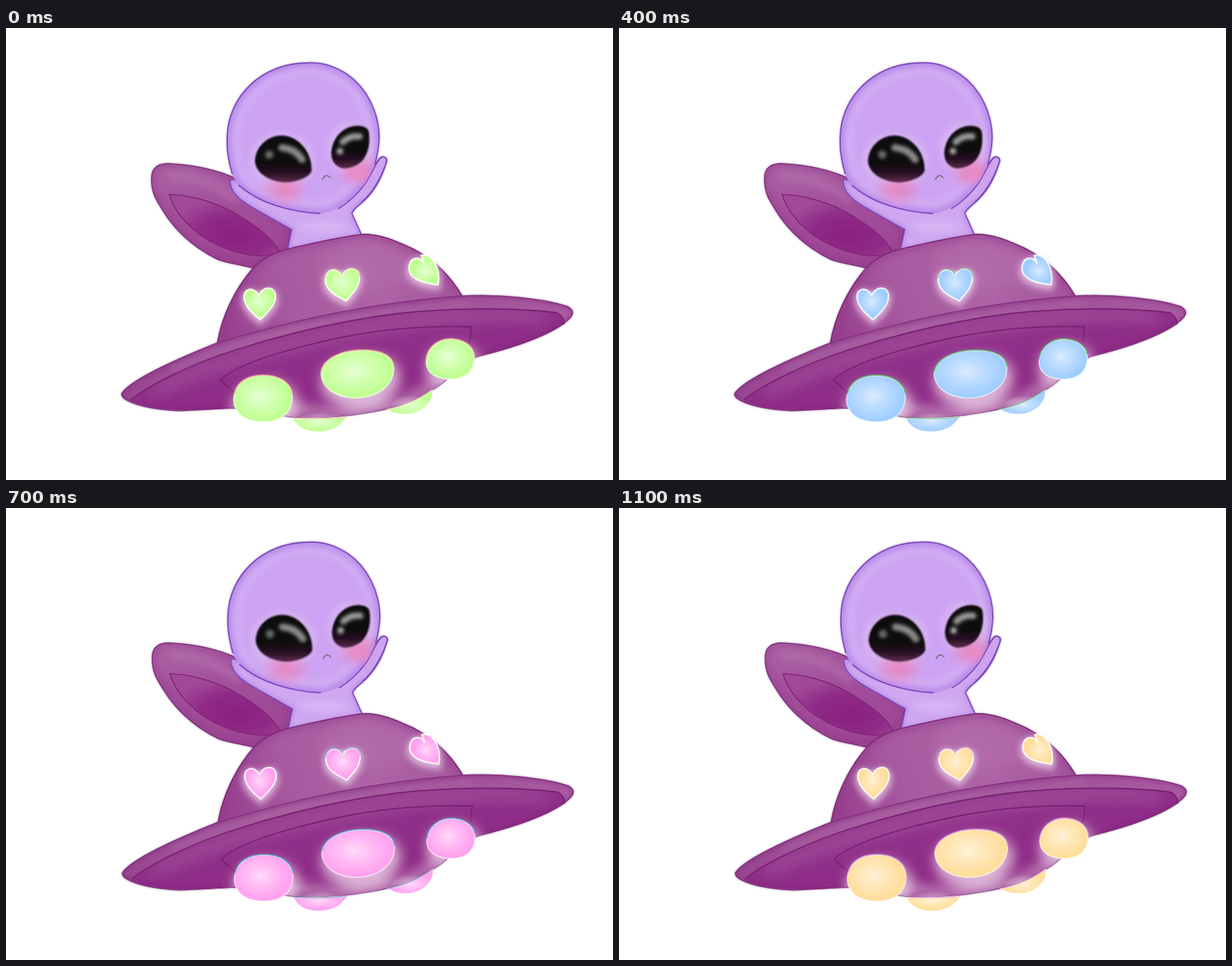
Animation of 867 by 646 pixels, one loop 1200 ms. Source, as an HTML page without scripts:

```html
<!DOCTYPE html>
<html lang="en">
<head>
<meta charset="utf-8">
<title>Little saucer</title>
<style>
html, body { margin: 0; width: 100%; height: 100%; overflow: hidden; background: #fff; }
svg { display: block; width: 100vw; height: 100vh; }
.ship { animation: jitter 1.2s step-end infinite; }
.lights { animation: hue 1.2s step-end infinite; }
.rim { animation: rim 1.2s step-end infinite; fill: none; stroke-width: 1.5; }
@keyframes jitter {
  0% { transform: translate(0, 0); }
  8.333% { transform: translate(1px, -1px); }
  16.667% { transform: translate(1px, 0); }
  25% { transform: translate(1px, -1px); }
  33.333% { transform: translate(0, 0); }
  41.667% { transform: translate(0, -1px); }
  50%, 100% { transform: translate(1px, -1px); }
}
@keyframes hue {
  0% { color: #c1ff93; }
  8.333% { color: #9dffb6; }
  16.667% { color: #98fff0; }
  25% { color: #9ceaff; }
  33.333% { color: #a1ceff; }
  41.667% { color: #bcb4ff; }
  50% { color: #daa0ff; }
  58.333% { color: #ffa2f0; }
  66.667% { color: #ff9fc3; }
  75% { color: #ffa6a3; }
  83.333% { color: #ffc39e; }
  91.667%, 100% { color: #ffde9c; }
}
@keyframes rim {
  0% { stroke: #e9b58c; }
  8.333% { stroke: #d6b35a; }
  16.667% { stroke: #b5b044; }
  25% { stroke: #8dba50; }
  33.333% { stroke: #62b86a; }
  41.667% { stroke: #58b895; }
  50% { stroke: #58b2b6; }
  58.333% { stroke: #5ca4c4; }
  66.667% { stroke: #7088cc; }
  75% { stroke: #8878d0; }
  83.333% { stroke: #b184d4; }
  91.667%, 100% { stroke: #dc9cd4; }
}
</style>
</head>
<body>
<svg viewBox="0 0 867 646" preserveAspectRatio="none">
<defs>
  <filter id="b1" x="-30%" y="-30%" width="160%" height="160%"><feGaussianBlur stdDeviation=".8"/></filter>
  <filter id="b2" x="-50%" y="-50%" width="200%" height="200%"><feGaussianBlur stdDeviation="2.4"/></filter>
  <filter id="b5" x="-50%" y="-50%" width="200%" height="200%"><feGaussianBlur stdDeviation="5"/></filter>
  <filter id="b9" x="-60%" y="-60%" width="220%" height="220%"><feGaussianBlur stdDeviation="9"/></filter>

  <linearGradient id="lidFill" x1=".25" y1="0" x2=".5" y2="1">
    <stop offset="0" stop-color="#aa62a3"/><stop offset=".45" stop-color="#a24f9a"/><stop offset="1" stop-color="#9c4694"/>
  </linearGradient>
  <radialGradient id="lidIn" cx=".6" cy=".66" r=".6">
    <stop offset="0" stop-color="#8a1f80"/><stop offset=".55" stop-color="#8f2a86"/><stop offset="1" stop-color="#a04998"/>
  </radialGradient>
  <linearGradient id="domeFill" x1="0" y1=".6" x2="1" y2=".4">
    <stop offset="0" stop-color="#98408f"/><stop offset=".3" stop-color="#a75a9f"/>
    <stop offset=".65" stop-color="#ad64a6"/><stop offset="1" stop-color="#a4559c"/>
  </linearGradient>
  <linearGradient id="brimFill">
    <stop offset="0" stop-color="#984690"/><stop offset=".35" stop-color="#a3579b"/>
    <stop offset=".7" stop-color="#a04f98"/><stop offset="1" stop-color="#a85aa0"/>
  </linearGradient>
  <linearGradient id="underFill" gradientUnits="userSpaceOnUse" x1="460" y1="400" x2="490" y2="555">
    <stop offset="0" stop-color="#9c4593"/><stop offset=".4" stop-color="#90308a"/><stop offset="1" stop-color="#8c2783"/>
  </linearGradient>
  <radialGradient id="shine" cx=".45" cy=".45" r=".52">
    <stop offset="0" stop-color="#fff" stop-opacity=".62"/><stop offset=".4" stop-color="#fff" stop-opacity=".32"/>
    <stop offset="1" stop-color="#fff" stop-opacity="0"/>
  </radialGradient>
  <linearGradient id="eyeFill" x1="0" y1="0" x2="0" y2="1">
    <stop offset=".58" stop-color="#0b080b"/><stop offset=".82" stop-color="#2c1227"/><stop offset="1" stop-color="#5f2a4c"/>
  </linearGradient>

  <path id="lid" d="M208 214C208 200 217 193 235 194C270 196 301 202 330 216C355 240 377 264 407 288L402 316L376 324L353 343C336 338 320 337 303 331C272 316 247 294 230 270C215 247 207 236 208 214Z"/>
  <path id="body" d="M320 218C325 214 331 220 338 226L360 240L490 240L512 218C520 206 527 193 535 185C541 182 546 187 543 193C536 216 525 235 509 249C501 256 496 259 494 265C499 276 503 285 508 296L480 302L402 317L408 288C391 279 378 271 358 260C339 249 321 239 320 218Z"/>
  <path id="head" d="M323 208C318 191 315 174 316 156C317 97 366 51 428 50C450 48 470 55 487 66C515 85 533 121 533 157C532 190 522 212 504 232C488 250 470 262 451 265C416 263 378 257 352 240C336 230 327 220 323 208Z"/>
  <path id="dome" d="M302 450C308 414 326 374 353 343C365 330 384 321 402 316C440 307 475 299 508 295C534 294 556 304 580 315C611 331 636 356 652 384L640 425L320 480Z"/>
  <path id="saucer" d="M165 523C174 507 222 482 302 450C400 420 520 392 652 383C706 380 768 387 802 398C811 403 811 408 806 414C788 434 735 455 671 470L632 499C622 510 612 515 596 525C560 546 480 560 410 556L328 543C300 544 275 546 247 547C212 546 181 539 168 529Q165 526 165 523Z"/>
  <path id="under" d="M179 533C205 510 265 480 328 460C400 437 480 418 560 408C640 399 732 400 787 407Q797 412 797 423C770 442 722 459 671 470L632 499C622 510 612 515 596 525C560 546 480 560 410 556L328 543C290 546 215 551 179 533Z"/>
  <path id="eyeL" d="M356 190C357 167 376 154 394 154C420 155 437 180 436 204C434 213 414 220 398 220C374 218 357 207 356 190Z"/>
  <path id="eyeR" d="M465 178C467 154 484 140 503 140Q518 141 518 150C520 165 517 182 506 192C496 199 488 200 481 200C470 197 465 190 465 178Z"/>
  <clipPath id="headClip"><use href="#head"/></clipPath>
  <clipPath id="domeClip"><use href="#dome"/></clipPath>
  <clipPath id="lidClip"><use href="#lid"/></clipPath>
  <clipPath id="bodyClip"><use href="#body"/></clipPath>
  <clipPath id="saucerClip"><use href="#saucer"/></clipPath>

  <g id="bulbs">
    <path d="M325 531C326 509 344 497 367 497C391 497 408 508 409 527C409 550 393 563 368 563C342 563 326 552 325 531Z"/>
    <path d="M450 495C451 475 474 461 510 461C539 461 554 471 554 487C553 512 530 529 498 529C470 528 451 514 450 495Z"/>
    <path d="M600 477C601 457 616 445 636 445C656 446 669 456 669 473C668 492 655 502 636 502C614 502 600 493 600 477Z"/>
  </g>
  <g id="feet">
    <path d="M410 558C432 558 460 559 486 556C478 571 462 577 446 577C428 577 416 571 410 558Z"/>
    <path d="M544 545C569 541 591 530 609 517C611 535 594 552 570 552Q556 552 544 545Z"/>
  </g>
  <g id="hearts">
    <path d="M361 382C367 369 383 368 385 381C386 396 374 406 363 417C352 408 342 399 340 386C339 371 354 369 361 382Z"/>
    <path d="M480 354C484 342 503 339 505 355C505 371 495 379 486 390C473 383 457 377 456 361C455 343 474 341 480 354Z"/>
    <path d="M597 336L593 325C603 322 611 331 615 341Q620 353 617 367C602 365 580 362 576 347C573 329 590 323 597 336Z"/>
  </g>
  <g id="lamps"><use href="#feet"/><use href="#bulbs"/><use href="#hearts"/></g>
</defs>

<g class="ship" stroke-linejoin="round" stroke-linecap="round">
  <!-- soft fringe around the silhouette -->
  <g fill="none" stroke="#8d6a92" stroke-width="3.5" opacity=".4" filter="url(#b1)">
    <use href="#lid"/><use href="#body"/><use href="#head"/><use href="#dome"/><use href="#saucer"/>
  </g>

  <!-- lid -->
  <use href="#lid" fill="url(#lidFill)"/>
  <g clip-path="url(#lidClip)" fill="none" filter="url(#b5)">
    <use href="#lid" stroke="#8d2d84" stroke-width="8" opacity=".45"/>
    <path d="M238 213Q282 212 328 244" stroke="#b87bb3" stroke-width="12" opacity=".45"/>
  </g>
  <path d="M233 238C258 238 294 247 322 262C354 280 381 299 390 320L374 325C344 328 304 315 278 296C252 277 239 257 233 238Z" fill="url(#lidIn)" stroke="#842479" stroke-width="1.6"/>
  <use href="#lid" fill="none" stroke="#80307d" stroke-width="1.6"/>

  <!-- alien -->
  <use href="#body" fill="#cfa8f1"/>
  <g clip-path="url(#bodyClip)"><use href="#body" fill="none" stroke="#b584e4" stroke-width="7" filter="url(#b2)" opacity=".7"/>
    <ellipse cx="452" cy="284" rx="35" ry="8" fill="#dcc0f5" filter="url(#b5)" opacity=".6"/></g>
  <use href="#body" fill="none" stroke="#7c48bb" stroke-width="1.7"/>
  <use href="#head" fill="#cda3f3"/>
  <g clip-path="url(#headClip)" fill="none">
    <use href="#head" stroke="#dabdf4" stroke-width="38" filter="url(#b5)" opacity=".4"/>
    <use href="#head" stroke="#b585e8" stroke-width="11" filter="url(#b5)"/>
    <g fill="#dbbdf3" filter="url(#b5)" opacity=".65">
      <ellipse cx="394" cy="190" rx="47" ry="41"/><ellipse cx="492" cy="172" rx="34" ry="38"/>
    </g>
    <g fill="#eb80b7" filter="url(#b9)">
      <ellipse cx="398" cy="230" rx="25" ry="16" opacity=".8"/>
      <ellipse cx="503" cy="203" rx="24" ry="16" opacity=".8"/>
    </g>
  </g>
  <path d="M475 258C490 249 502 237 512 224M323 208C318 191 315 174 316 156C317 97 366 51 428 50C450 48 470 55 487 66C515 85 533 121 533 157Q532 177 527 194M333 225C361 250 406 263 448 265" fill="none" stroke="#7a49c0" stroke-width="1.8"/>
  <path d="M512 224C523 210 527 192 536 185C543 183 545 188 542 195C535 215 525 233 509 248Z" fill="#cda3f0"/>
  <path d="M512 224C523 210 527 192 536 185C543 183 545 188 542 195C535 215 525 233 509 248" fill="none" stroke="#7c48bb" stroke-width="1.6"/>
  <ellipse cx="503" cy="211" rx="15" ry="9" fill="#e88bc5" filter="url(#b5)" opacity=".65"/>
  <g fill="url(#eyeFill)" stroke="#251426" filter="url(#b1)"><use href="#eyeL"/><use href="#eyeR"/></g>
  <g filter="url(#b2)">
    <circle cx="376" cy="181" r="6" fill="#6a6a6a"/>
    <path d="M394 171Q414 173 423 188" fill="none" stroke="#8a8a8a" stroke-width="10"/>
    <circle cx="477" cy="176" r="4.5" fill="#b8b8b8"/>
    <path d="M481 163Q491 153 505 155" fill="none" stroke="#9a9a9a" stroke-width="9"/>
  </g>
  <path d="M452 216Q457 207 463 214" fill="none" stroke="#80758a" stroke-width="1.8"/>

  <!-- dome -->
  <use href="#dome" fill="url(#domeFill)"/>
  <g clip-path="url(#domeClip)" fill="none">
    <use href="#dome" stroke="#933b8b" stroke-width="12" filter="url(#b5)" opacity=".5"/>
    <ellipse cx="520" cy="342" rx="72" ry="32" fill="#b56eac" filter="url(#b9)" opacity=".6"/>
  </g>
  <use href="#dome" fill="none" stroke="#7d2876" stroke-width="1.7"/>

  <!-- saucer -->
  <use href="#saucer" fill="url(#brimFill)"/>
  <path d="M240 486C350 440 500 407 660 394" fill="none" stroke="#b477ad" stroke-width="9" filter="url(#b5)" opacity=".4"/>
  <use href="#under" fill="url(#underFill)"/>
  <g clip-path="url(#saucerClip)" fill="none">
    <path d="M215 518C290 483 440 438 590 419Q700 407 765 413" stroke="#ac64a4" stroke-width="14" filter="url(#b9)" opacity=".55"/>
    <use href="#saucer" stroke="#80207a" stroke-width="5" filter="url(#b2)" opacity=".45"/>
  </g>
  <g fill="none" stroke="#78206f" stroke-width="1.8">
    <path d="M179 531C205 510 265 480 328 460C400 437 480 418 560 408C640 399 732 400 787 407Q797 412 797 423"/>
    <path d="M326 521L306 503C331 480 400 459 480 442C540 430 604 425 665 427L662 449"/>
    <use href="#saucer" stroke="#842f80" stroke-width="1.5"/>
  </g>

  <!-- lights: the glow falls below and beside each lamp -->
  <g fill="#f6e2f0" filter="url(#b9)" clip-path="url(#saucerClip)">
    <use href="#bulbs" y="11" x="4" stroke="#f6e2f0" stroke-width="9" opacity=".75"/>
    <path d="M330 545H412L480 553L560 540L612 512" fill="none" stroke="#f6e2f0" stroke-width="14" opacity=".55"/>
  </g>
  <use href="#hearts" y="4" fill="#f8e4f2" stroke="#f8e4f2" stroke-width="8" filter="url(#b5)" opacity=".65"/>
  <g class="lights">
    <use href="#lamps" fill="currentColor"/>
    <g fill="url(#shine)">
      <ellipse cx="367" cy="530" rx="40" ry="32"/><ellipse cx="502" cy="494" rx="51" ry="33"/>
      <ellipse cx="635" cy="473" rx="33" ry="28"/><circle cx="363" cy="393" r="19"/>
      <circle cx="482" cy="366" r="21"/><circle cx="601" cy="349" r="18"/>
      <ellipse cx="450" cy="563" rx="36" ry="13"/><ellipse cx="580" cy="540" rx="30" ry="14"/>
    </g>
    <use href="#bulbs" fill="none" stroke="#fff" stroke-width="1.6" opacity=".65"/>
    <use href="#feet" fill="none" stroke="#fff" stroke-width="1.4" opacity=".6"/>
    <use href="#hearts" fill="none" stroke="#fff" stroke-width="2.2" opacity=".85"/>
    <g class="rim">
      <path d="M326 523C330 505 346 496 367 496C390 496 406 506 409 522M450 491C453 474 476 460 510 460C539 460 553 470 554 483M600 473C602 456 617 444 636 444C654 445 666 453 669 466"/>
      <path d="M456 357C457 342 475 341 480 353M484 347C494 340 505 344 505 356M410 557Q450 560 486 556M544 545Q580 538 609 517" opacity=".6"/>
    </g>
  </g>
</g>
</svg>
</body>
</html>
```
